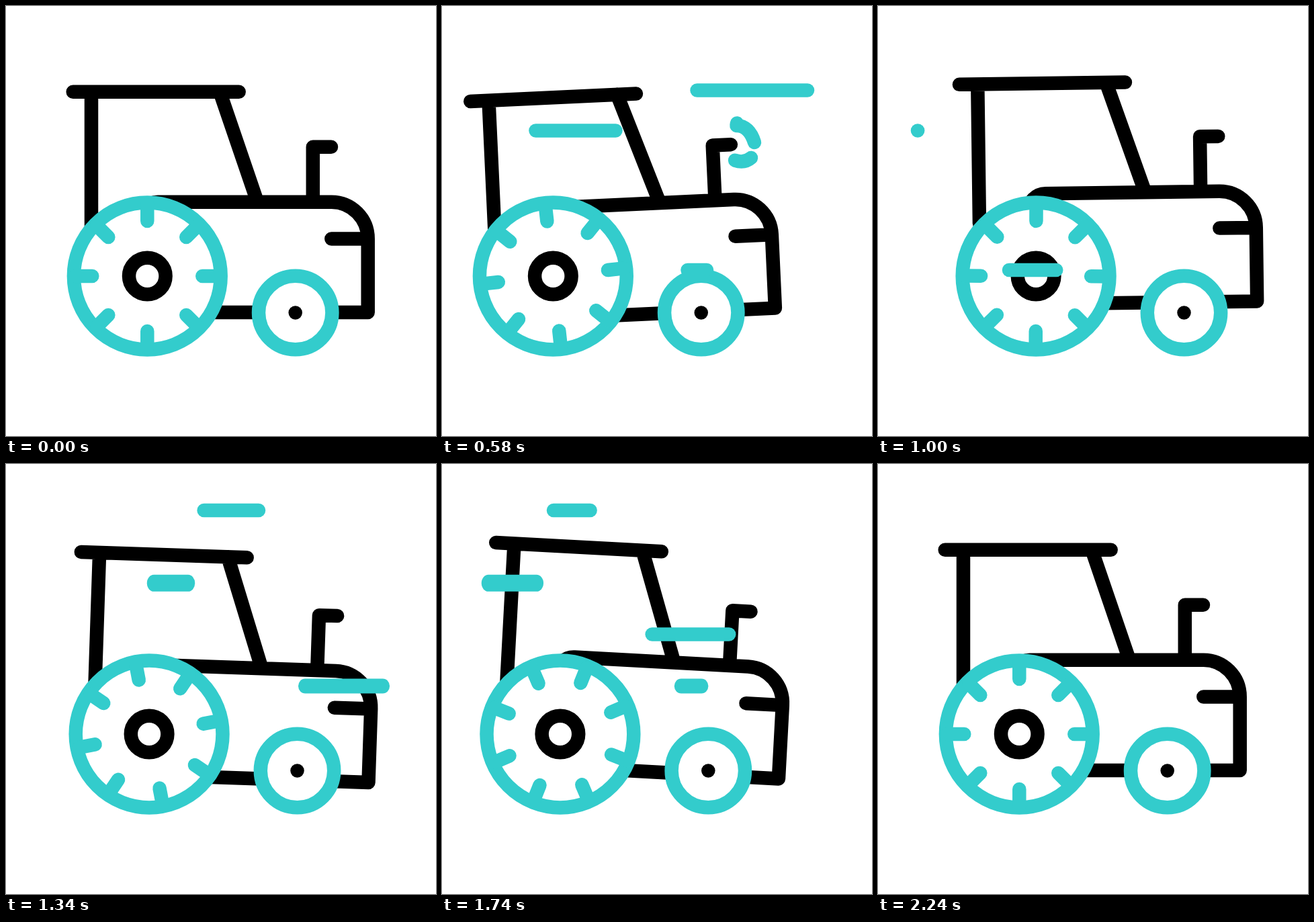
Animation, 640 px wide and 640 px high, one loop 2.4 s. Source, as an HTML page with a canvas:

```html
<!DOCTYPE html>
<html lang="en">
<head>
<meta charset="utf-8">
<title>Tractor</title>
<style>
  html, body { margin: 0; width: 100%; height: 100%; overflow: hidden; background: #fff; }
  canvas { display: block; width: 640px; height: 640px; }
</style>
</head>
<body>
<canvas id="stage" width="640" height="640"></canvas>
<script>
const ctx = document.getElementById('stage').getContext('2d');
const LOOP = 2400;
const BLACK = '#000';
const TEAL = '#33cccc';
const WEIGHT = 20.5;
const REAR = { x: 210.3, y: 402, r: 109.4 };
const FRONT = { x: 430.7, y: 456.5, r: 54.7 };

// Symmetric ease in and out, cubic-bezier(a, 0, 1 - a, 1); a = 1/3 is smoothstep.
function ease(p, a = 1 / 3) {
  if (p <= 0) return 0;
  if (p >= 1) return 1;
  let lo = 0, hi = 1;
  for (let i = 0; i < 24; i++) {
    const u = (lo + hi) / 2;
    const x = u * u * (3 - 2 * u) + 3 * a * u * (1 - u) * (1 - 2 * u);
    if (x < p) lo = u; else hi = u;
  }
  return lo * lo * (3 - 2 * lo);
}

// Sum of eased steps between [time, value] poses.
function swing(poses, t) {
  let value = poses[0][1];
  for (let i = 1; i < poses.length; i++) {
    const [t0, v0] = poses[i - 1], [t1, v1] = poses[i];
    value += (v1 - v0) * ease((t - t0) / (t1 - t0));
  }
  return value;
}

const DRIVE = [[0, 0], [560, -45.3], [1105, 32.2], [1637, -38.5], [2150, 0]];
const TILT = [[0, 0], [590, -2.64], [1680, 3.3], [2070, 0]];
const BOUNCE = [[0, 0], [520, 9.7], [1025, -12.5], [1370, 7.3], [1890, -8.2], [2240, 0]];

// Each streak runs left over its length; its tail repeats the head's move after a lag.
const STREAKS = [
  { y: 125.5, from: 556, length: 202, start: 235, time: 445 },
  { y: 185.5, from: 295, length: 236, start: 234, time: 571, lag: 205 },
  { y: 393, from: 394, length: 199, start: 449, time: 554, lag: 220 },
  { y: 69, from: 376, length: 210, start: 1130, time: 497 },
  { y: 177.3, from: 271, length: 202, start: 1195, time: 445, height: 25 },
  { y: 330.5, from: 562, length: 206, start: 1036, time: 560, height: 22 },
  { y: 253.5, from: 471, length: 199, start: 1348, time: 554, lag: 225 }
];

const BODY = new Path2D(
  'M99.7 127.7H346.7 M127 127.7V335 M318.2 127.7L374.2 291.7' +
  'M200 318A26 26 0 0 1 226 291.7H484.5A54.3 54.8 0 0 1 538.7 346.5V456H290' +
  'M484.3 346.5H538.7 M456.8 291.7V209.8H484');

const PUFFS = [
  { path: new Path2D('M439 174.5L438.5 178C451 178 460 187 465 203'), length: 48 },
  { path: new Path2D('M436 229.8Q450 234.5 460 226'), length: 28 }
];

function stroke(color, path) {
  ctx.strokeStyle = color;
  if (path) ctx.stroke(path); else ctx.stroke();
}

function circle(x, y, r) {
  ctx.beginPath();
  ctx.arc(x, y, r, 0, 2 * Math.PI);
}

function tire(wheel) {
  circle(wheel.x, wheel.y, wheel.r);
  ctx.fillStyle = '#fff';
  ctx.fill();
  stroke(TEAL);
}

function drawBody(t) {
  ctx.save();
  ctx.translate(REAR.x, REAR.y + swing(BOUNCE, t));
  ctx.rotate(swing(TILT, t) * Math.PI / 180);
  ctx.translate(-REAR.x, -REAR.y);
  stroke(BLACK, BODY);
  ctx.restore();
}

function drawRearWheel(t) {
  tire(REAR);
  const turn = 2 * Math.PI * ease(t / 2000, 0.24);
  ctx.beginPath();
  for (let i = 0; i < 8; i++) {
    const angle = turn + i * Math.PI / 4;
    const c = Math.cos(angle), s = Math.sin(angle);
    ctx.moveTo(REAR.x + 82 * c, REAR.y + 82 * s);
    ctx.lineTo(REAR.x + 106 * c, REAR.y + 106 * s);
  }
  stroke(TEAL);
  circle(REAR.x, REAR.y, 27.3);
  stroke(BLACK);
}

function drawFrontWheel() {
  tire(FRONT);
  circle(FRONT.x, FRONT.y, WEIGHT / 2);
  ctx.fillStyle = BLACK;
  ctx.fill();
}

function drawSmoke(t) {
  const end = ease((t - 400) / 170);
  const start = ease((t - 590) / 170);
  if (end <= start) return;
  for (const { path, length } of PUFFS) {
    ctx.setLineDash([(end - start) * length, 2 * length]);
    ctx.lineDashOffset = -start * length;
    stroke(TEAL, path);
  }
  ctx.setLineDash([]);
}

function drawStreak({ y, from, length, start, time, lag = 280, height = WEIGHT }, t) {
  const age = t - start;
  if (age <= 0 || age >= time + lag) return;
  const left = from - length * ease(age / time);
  const right = from - length * ease((age - lag) / time);
  const r = WEIGHT / 2;
  ctx.beginPath();
  ctx.roundRect(left - r, y - height / 2, right - left + WEIGHT, height, { x: r, y: height / 2 });
  ctx.fillStyle = TEAL;
  ctx.fill();
}

function draw() {
  const t = performance.now() % LOOP;
  ctx.fillStyle = '#fff';
  ctx.fillRect(0, 0, 640, 640);
  ctx.lineWidth = WEIGHT;
  ctx.lineCap = ctx.lineJoin = 'round';

  ctx.save();
  ctx.translate(swing(DRIVE, t), 0);
  drawBody(t);
  drawRearWheel(t);
  drawFrontWheel();
  ctx.restore();

  drawSmoke(t);
  for (const streak of STREAKS) drawStreak(streak, t);
  requestAnimationFrame(draw);
}
draw();
</script>
</body>
</html>
```
